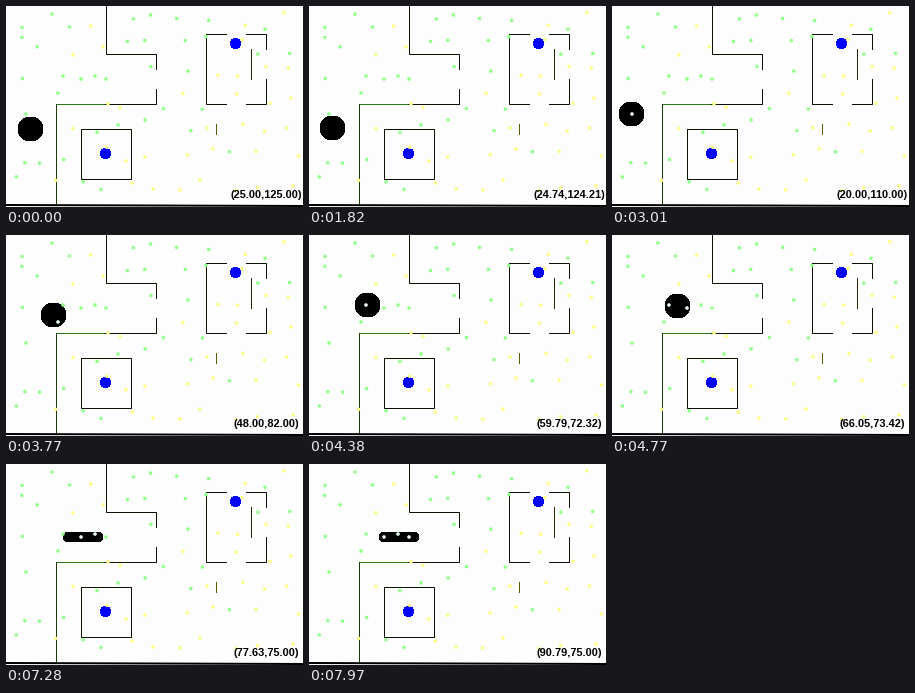
A matplotlib script for the animation above (8000 ms loop, 297 by 201 pixels).

```python
import matplotlib.pyplot as plt
import numpy as np
from matplotlib.animation import FuncAnimation

W, H, DPI = 297, 201, 64
PX = 72 / DPI                       # points per pixel
TICK, LOOP = 20, 8000               # ms
STEPS = 19                          # moves per leg of the route
OFFSET = np.array([-0.5, -2.5])     # world to stage
RESHAPE = 5550                      # moment the disc becomes a bar

# start time, ms per move
ROUTE = [(25, 125), (20, 110), (58, 72), (75, 75), (100, 75)]
TIMING = [(1766, 53.0), (3010, 53.7), (4280, 52.9), (7141, 69.0)]

PAPER = "#fdfdfd"
INK, OLIVE, MOSS = "#0c1000", "#5a5a00", "#1c3a08"
GREEN = (0.58, 1.0, 0.55, 1)
YELLOW = (1.0, 1.0, 0.55, 1)
PALE = (0.93, 1.0, 0.93, 1)

fig = plt.figure(figsize=(W / DPI, H / DPI), dpi=DPI, facecolor=PAPER)
ax = fig.add_axes([0, 0, 1, 1])
ax.set_xlim(0, W)
ax.set_ylim(H, 0)
ax.axis("off")


def line(*points, color=INK, width=1, **kw):
    xs, ys = (np.array(points, float) + OFFSET).T
    kw.setdefault("solid_capstyle", "projecting")
    return ax.plot(xs, ys, color=color, lw=width * PX,
                   solid_joinstyle="miter", **kw)[0]


def box(x, y, w, h):
    line((x, y), (x + w, y), (x + w, y + h), (x, y + h), (x, y))


def door(*points):
    line(*points, color=PAPER, width=2, solid_capstyle="butt")


def draw_map():
    line((100, 0), (100, 50), (150, 50), (150, 65))
    line((150, 85), (150, 100), (50, 100))
    line((50, 100), (50, 200), color=MOSS)
    line((51, 100), (98, 100), color="#2f7a10")

    box(75, 125, 50, 50)
    box(200, 30, 60, 70)
    for y in (30, 100):
        door((221, y), (240, y))
    door((260, 46), (260, 75))
    line((245, 45), (245, 75), color="#262600")
    line((210, 120), (210, 130), color=OLIVE)

    ax.fill([0, W, W, 0], [198, 199, 201, 200], color="black", lw=0)
    for center in [(230, 40), (100, 150)]:
        ax.add_patch(plt.Circle(center + OFFSET, 5, color="blue", lw=0,
                                antialiased=False))


def scatter_samples():
    """Jittered grid of samples, with a few fixed ones along the route."""
    rng = np.random.default_rng(7)
    cell = 27
    gx, gy = np.meshgrid(np.arange(cell / 2, W, cell),
                         np.arange(cell / 2, H, cell))
    pts = np.column_stack([gx.ravel(), gy.ravel()])
    pts += rng.uniform(-10, 10, pts.shape)

    path = np.vstack([np.linspace(a, b, 10)
                      for a, b in zip(ROUTE, ROUTE[1:])]) + OFFSET
    gap = np.abs(pts[:, None] - path[None])
    pts = pts[~((gap[..., 0] < 22) & (gap[..., 1] < 14)).any(axis=1)]

    on_route = [(20, 108), (52, 87), (57, 70), (75, 73), (89, 70), (100, 73)]
    pts = np.vstack([on_route, pts])
    warm = rng.random(len(pts)) < (pts[:, 0] / W + pts[:, 1] / H) / 2
    warm[:len(on_route)] = False
    return pts, np.where(warm[:, None], YELLOW, GREEN)


draw_map()
dots, dot_colors = scatter_samples()
samples = ax.scatter(*dots.T, s=(3.6 * PX) ** 2, c=dot_colors,
                     linewidths=0, zorder=4)
robot = line((25, 125), (25.01, 125), color="black", width=24,
             solid_capstyle="round", zorder=3, antialiased=False)
label = ax.text(260, 192, "", ha="center", va="baseline", color="black",
                family="Liberation Sans", weight="bold", size=11 * PX,
                zorder=5)


def position(t):
    pos = np.array(ROUTE[0], float)
    for (start, period), a, b in zip(TIMING, ROUTE, ROUTE[1:]):
        if t >= start:
            k = min(int((t - start) / period), STEPS)
            pos = np.array(a) + np.subtract(b, a) * k / STEPS
    return pos


def draw(i):
    t = i * TICK + TICK / 2
    x, y = position(t)
    half, radius = (15, 5) if t >= RESHAPE else (0.005, 12)
    cx, cy = np.floor([x, y]) + OFFSET

    robot.set_data([cx - half, cx + half], [cy, cy])
    robot.set_linewidth(2 * radius * PX)

    dx = np.maximum(np.abs(dots[:, 0] - cx) - half, 0)
    covered = np.hypot(dx, dots[:, 1] - cy) < radius
    samples.set_facecolor(np.where(covered[:, None], PALE, dot_colors))

    label.set_text(f"({x:.2f},{y:.2f})")
    return robot, samples, label


anim = FuncAnimation(fig, draw, frames=LOOP // TICK, interval=TICK,
                     init_func=lambda: draw(0), blit=True, repeat=True,
                     repeat_delay=0)
plt.show()
```
